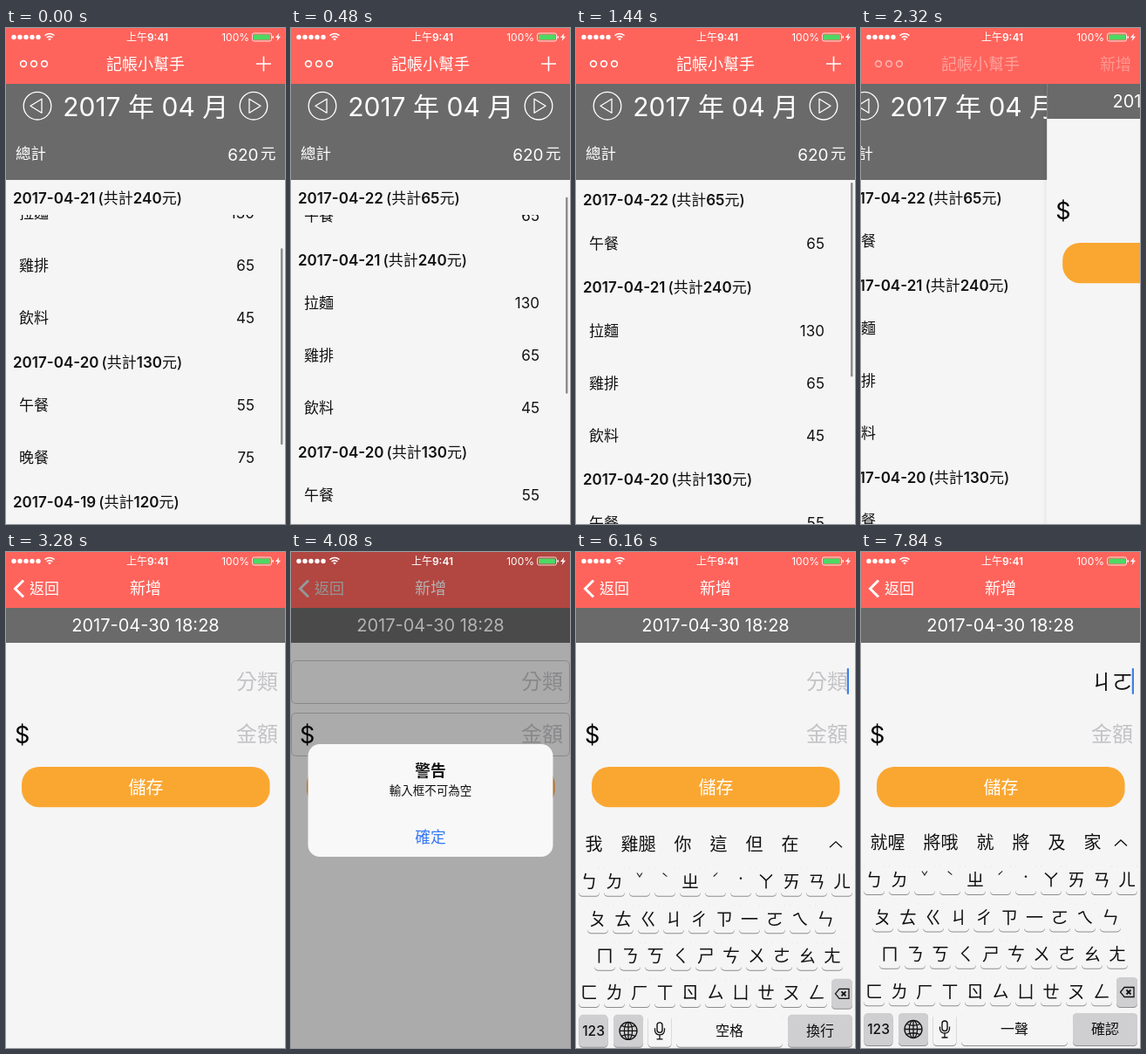
Write an HTML page that moves like this. It is 320 px wide and 568 px high and loops after 8000 ms.

```html
<!DOCTYPE html>
<html lang="zh-Hant">
<head>
<meta charset="utf-8">
<title>記帳小幫手</title>
<style>
html, body { margin: 0; width: 100%; height: 100%; overflow: hidden; background: #f5f5f5; }
svg { display: block; width: 100%; height: 100%; }
text { font-family: Inter, "Noto Sans CJK TC", "Noto Sans CJK JP", "Noto Sans CJK SC", "Noto Sans CJK", sans-serif; white-space: pre; }
.key { font-family: "Noto Sans CJK TC", "Noto Sans CJK JP", "Noto Sans CJK", sans-serif; }
</style>
</head>
<body>
<svg id="stage" viewBox="0 0 320 568"></svg>
<script>
const LOOP = 8000;
const RED = '#fe645c', GRAY = '#6a6a6a', PAPER = '#f5f5f5', INK = '#111';

// y is the optical middle of the line
const text = (x, y, s, size, { fill = INK, anchor = 'start', weight = 400, id = '', cls = '' } = {}) =>
  `<text x="${x}" y="${y + size * 0.37}" font-size="${size}" fill="${fill}" text-anchor="${anchor}"
    font-weight="${weight}"${id && ` id="${id}"`}${cls && ` class="${cls}"`}>${s}</text>`;
const medium = (s, dx = 0) => `<tspan dx="${dx}" font-weight="500">${s}</tspan>`;
const rect = (x, y, w, h, fill, rx = 0, extra = '') =>
  `<rect x="${x}" y="${y}" width="${w}" height="${h}" rx="${rx}" fill="${fill}" ${extra}/>`;
const line = (d, color, width, extra = '') =>
  `<path d="${d}" fill="none" stroke="${color}" stroke-width="${width}" ${extra}/>`;
const circle = (x, y, r, attrs) => `<circle cx="${x}" cy="${y}" r="${r}" ${attrs}/>`;
const group = (id, body, attrs = '') => `<g id="${id}" ${attrs}>${body}</g>`;
const white = (anchor = 'start', weight = 400, id = '') => ({ fill: '#fff', anchor, weight, id });

// ---- ledger list ----
const LIST_TOP = 174, HEAD_H = 40, ROW_H = 60, CONTENT_H = 680;
const days = [
  ['2017-04-22', 65, [['午餐', 65]]],
  ['2017-04-21', 240, [['拉麵', 130], ['雞排', 65], ['飲料', 45]]],
  ['2017-04-20', 130, [['午餐', 55], ['晚餐', 75]]],
  ['2017-04-19', 120, [['晚餐', 120]]],
  ['2017-04-18', 65, [['午餐', 65]]]
];
const heads = [];
let rowsSvg = '', headsSvg = '', nextY = 0;
days.forEach(([date, sum, items], i) => {
  heads.push(nextY);
  headsSvg += group('head' + i, rect(0, 0, 320, HEAD_H, PAPER)
    + text(8, 20.5, date + medium('(共計', 3) + sum + medium('元)'), 17, { weight: 600 }));
  nextY += HEAD_H;
  for (const [name, cost] of items) {
    rowsSvg += text(15, nextY + 30, name, 17) + text(285, nextY + 30, cost, 17, { anchor: 'end' });
    nextY += ROW_H;
  }
});

const arrow = (x, dir) => circle(x, 89.2, 15.8, 'fill="none" stroke="#fff" stroke-width="1.3"')
  + line(`M${x + 8 * dir} 89.2L${x - 5 * dir} 81.2V97.2Z`, '#fff', 1.3, 'stroke-linejoin="round"');

const ledger = group('ledger',
  rect(0, 64, 320, 504, PAPER) + group('rows', rowsSvg) + headsSvg
  + rect(315, 0, 2.5, 10, '#8e8e90', 1.2, 'id="bar"')
  + rect(0, 64, 320, 110, GRAY) + arrow(36, -1) + arrow(284, 1)
  + text(65.2, 89.5, '2017 年 04 月', 30, white())
  + text(11, 144, '總計', 17.5, white())
  + text(289.5, 144.5, '620', 19, white('end')) + text(292, 144, '元', 17.5, white()));

// ---- entry form ----
const field = y => rect(0.5, y, 319, 49, 'none', 5, 'stroke="#b5b5b5"');
const hint = (y, s, id) => text(312, y, s, 24, { fill: '#c3c3c7', anchor: 'end', weight: 200, id });
const form = group('form',
  rect(-6, 64, 6, 504, 'url(#edge)', 0, 'id="shade"')
  + rect(0, 64, 320, 504, PAPER) + rect(0, 64, 320, 40, GRAY)
  + text(160, 84, '2017-04-30 18:28', 20, white('middle'))
  + group('boxes', field(124.5) + field(184.5))
  + hint(148.5, '分類', 'hint') + hint(208.5, '金額', '')
  + text(312, 148.5, '', 24, { anchor: 'end', id: 'typed', cls: 'key' })
  + rect(310.8, 133, 2.2, 30, '#3f7fe6', 1, 'id="caret"')
  + text(10, 209, '$', 27, { fill: '#000' })
  + rect(18, 246, 284.6, 46.2, '#faa732', 20)
  + text(160.5, 269.7, '儲存', 20, white('middle')));

// ---- navigation bar ----
const nav = rect(0, 0, 320, 64, RED)
  + group('dots', [20, 32, 44].map(x => circle(x, 41, 3.4, 'fill="none" stroke="#fff" stroke-width="1.6"')).join(''))
  + line('M287 41H304M295.5 32.5V49.5', '#fff', 1.6, 'id="plus"')
  + text(160, 41.5, '記帳小幫手', 18, white('middle', 400, 'oldTitle'))
  + text(160, 41.5, '新增', 18, white('middle', 400, 'newTitle'))
  + line('M20 32.5L10.5 42L20 51.5', '#fff', 3, 'id="chevron"')
  + text(27, 42, '返回', 17, white('start', 400, 'back'));

const status = [9, 16, 23, 30, 37].map(x => circle(x, 10.5, 2.7, 'fill="#fff"')).join('')
  + line('M44.5 8.6Q50 4.2 55.5 8.6M46.6 11Q50 8.2 53.4 11', '#fff', 1.5)
  + '<path d="M48.2 12.5Q50 11 51.8 12.5L50 14.4Z" fill="#fff"/>'
  + text(162, 10.5, medium('上午') + '9:41', 12, white('middle', 600))
  + text(279, 10.5, '100%', 12, white('end'))
  + rect(282.5, 6, 22, 9, 'none', 2, 'stroke="#fff" stroke-width=".8"')
  + rect(284, 7.4, 19, 6.2, '#4cd964', 1) + rect(305.4, 9, 1.4, 3, '#fff', 0.7)
  + '<path d="M313.2 6L309 11H311.6L310.6 15L315 9.7H312.4Z" fill="#fff"/>';

// ---- alert, centred on its own origin ----
const alertBox = group('alert', rect(-135, -62, 270, 124, '#f8f8f8', 13)
  + text(0, -32.5, '警告', 17, { anchor: 'middle', weight: 600 })
  + text(0, -11, '輸入框不可為空', 13, { anchor: 'middle' })
  + text(0, 40, '確定', 17, { anchor: 'middle', fill: '#3478f6' }));

// ---- keyboard ----
const SPECIAL = '#cfcfd1', TONES = 'ˇˋˊ˙';
const cap = (x, y, w, h, fill = PAPER) => rect(x, y + 1, w, h, '#8b8d90', 4.5) + rect(x, y, w, h, fill, 4.5);
const glyph = (x, y, c) => TONES.includes(c)
  ? text(x, y - 4, c, 14, { anchor: 'middle', cls: 'key' })
  : text(x, y, c, 20, { anchor: 'middle', cls: 'key' });
const keyRows = [
  [15, 'ㄅㄉˇˋㄓˊ˙ㄚㄞㄢㄦ'], [25, 'ㄆㄊㄍㄐㄔㄗ一ㄛㄟㄣ'],
  [33, 'ㄇㄋㄎㄑㄕㄘㄨㄜㄠㄤ'], [15, 'ㄈㄌㄏㄒㄖㄙㄩㄝㄡㄥ']
];
const keys = keyRows.map(([x0, chars], r) => [...chars].map((c, i) => {
  const x = x0 + 29 * i, y = 376 + 42.4 * r;
  return cap(x - 12, y - 19, 24, 35) + glyph(x, y, c);
}).join('')).join('');
const icon = d => line(d, INK, 1.3);
const keyboard = group('keyboard', rect(0, 312, 320, 300, PAPER)
  + group('words', '') + icon('M291 336.5L298 330L305 336.5') + keys
  + cap(293, 487, 24, 34, SPECIAL)
  + icon('M297.5 504L302 498.5H313V509.5H302Z')
  + line('M304.5 501.5L309.5 506.5M309.5 501.5L304.5 506.5', INK, 1.8)
  + cap(3.5, 528, 33, 37, SPECIAL) + text(20, 546.5, '123', 15.5, { anchor: 'middle', weight: 500 })
  + cap(43, 528, 34, 37, SPECIAL)
  + circle(60, 546.5, 10, `fill="none" stroke="${INK}" stroke-width="1.3"`)
  + `<ellipse cx="60" cy="546.5" rx="4.6" ry="10" fill="none" stroke="${INK}" stroke-width="1.2"/>`
  + icon('M50 546.5H70M60 536.5V556.5M52 540.5Q60 544 68 540.5M52 552.5Q60 549 68 552.5')
  + cap(82.5, 528, 27, 37) + rect(93, 537, 6, 11.5, 'none', 3, `stroke="${INK}" stroke-width="1.4"`)
  + icon('M90.5 543.5V546Q91 551 96 551Q101 551 101.5 546V543.5M96 551V556M92.5 556H99.5')
  + cap(115, 528, 122, 37) + text(176, 546.5, '', 16, { anchor: 'middle', id: 'space' })
  + cap(243, 528, 74, 37, SPECIAL) + text(280, 546.5, '', 16, { anchor: 'middle', weight: 500, id: 'enter' }));

const stage = document.getElementById('stage');
stage.innerHTML = `<defs><linearGradient id="edge"><stop offset="0" stop-opacity="0"/>
  <stop offset="1" stop-opacity=".07"/></linearGradient></defs>`
  + ledger + form + nav + rect(0, 0, 320, 568, '#000', 0, 'id="dim"') + alertBox + keyboard + status;

const el = {};
stage.querySelectorAll('[id]').forEach(n => { el[n.id] = n; });
const clamp = v => Math.min(1, Math.max(0, v));
const move = (id, x, y) => el[id].setAttribute('transform', `translate(${x} ${y})`);
const fade = (id, o) => el[id].setAttribute('opacity', clamp(o));

// critically damped spring from 0 to 1
const spring = (t, start, w) => {
  const x = Math.max(0, t - start) / 1000 * w;
  return 1 - (1 + x) * Math.exp(-x);
};

function scrollAt(t) {
  if (t > 860) return -49 * (1 - spring(t, 860, 8));
  const k = clamp((t - 30) / 830);
  return 132 - 181 * (1 - Math.cos(Math.PI * k)) / 2;
}

function drawList(t) {
  const off = scrollAt(t);
  move('rows', 0, LIST_TOP - off);
  heads.forEach((y, i) => {
    const next = heads[i + 1] ?? CONTENT_H;
    const own = y - off;
    const stuck = off > 0 ? Math.min(Math.max(own, 0), Math.max(own, next - off - HEAD_H)) : own;
    move('head' + i, 0, LIST_TOP + stuck);
  });
  el.bar.setAttribute('y', 177 + Math.max(0, off) * 388 / CONTENT_H);
  el.bar.setAttribute('height', 225 + Math.min(0, off));
  fade('bar', (1760 - t) / 240);
}

function drawPush(t) {
  const p = spring(t, 2236, 14);
  move('ledger', -96 * p, 0);
  move('form', 320 * (1 - p), 0);
  fade('shade', p > 0 ? 1 - p : 0);
  move('oldTitle', -69 * p, 0);
  move('newTitle', 198 * (1 - p), 0);
  move('back', 90 * (1 - p), 0);
  fade('oldTitle', 1 - 1.8 * p);
  fade('dots', 1 - 1.5 * p);
  fade('plus', (t < 2000 ? 1 : 0.3) * (1 - 3 * p));
  fade('newTitle', p);
  fade('back', 2 * p - 1);
  fade('chevron', 2 * p - 1);
}

function drawAlert(t) {
  const show = spring(t, 3932, 20), gone = 1 - spring(t, 4620, 14);
  const s = 1.2 - 0.2 * show;
  el.alert.setAttribute('transform', `translate(160 284.5) scale(${s})`);
  fade('alert', show * 1.4 * gone);
  fade('dim', 0.38 * show * gone);
  fade('boxes', show * gone);
  const tint = `rgb(${[60, 45, 45].map(d => 255 - d * show * gone)})`;
  el.chevron.setAttribute('stroke', tint);
  el.back.setAttribute('fill', tint);
}

const inputs = [
  { at: 0, typed: '', words: ['我', '雞腿', '你', '這', '但', '在'], space: '空格', enter: '換行' },
  { at: 6720, typed: 'ㄐ', words: ['就', '將', '及', '家', '叫', '幾', '加'], space: '一聲', enter: '確認' },
  { at: 7040, typed: 'ㄐㄛ', words: ['就喔', '將哦', '就', '將', '及', '家'], space: '一聲', enter: '確認' }
];
let shown;
function drawInput(t) {
  const p = spring(t, 5810, 20);
  move('keyboard', 0, 258 * (1 - p));
  fade('caret', t < 5840 ? 0 : t < 6720 ? (6560 - t) / 160 : 1);
  const now = inputs.filter(s => s.at <= t).pop();
  if (now === shown) return;
  shown = now;
  let x = 10.5;
  el.words.innerHTML = now.words.map(w => {
    const out = text(x, 333, w, 20);
    x += 20 * w.length + 21;
    return out;
  }).join('');
  for (const id of ['typed', 'space', 'enter']) el[id].textContent = now[id];
  fade('hint', now.typed ? 0 : 1);
}

function draw(t) {
  drawList(t);
  drawPush(t);
  drawAlert(t);
  drawInput(t);
}

const begin = performance.now();
function tick() {
  draw((performance.now() - begin) % LOOP);
  requestAnimationFrame(tick);
}
tick();
</script>
</body>
</html>
```
